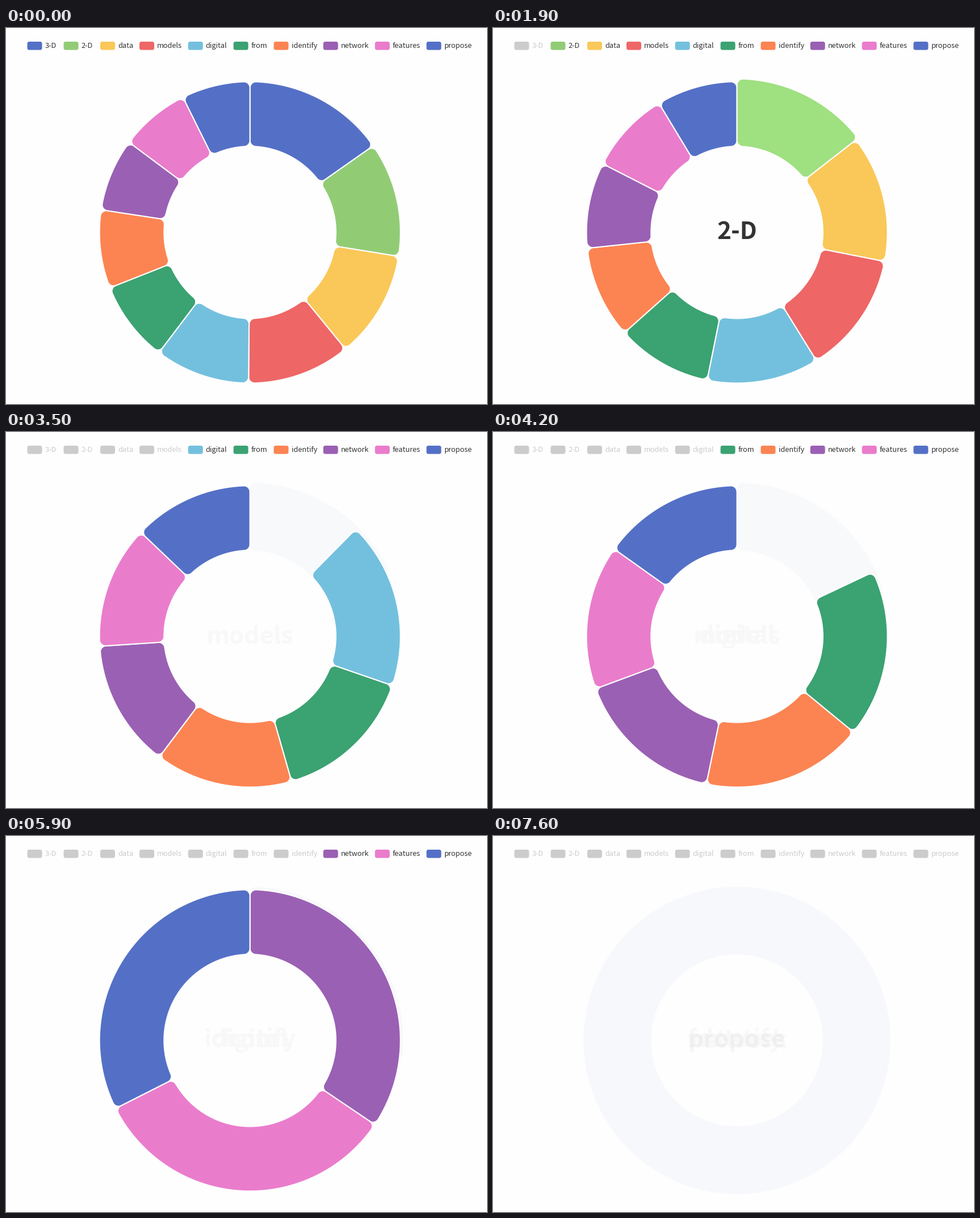
Animation of 847x661 px, one loop 8 s. Source, as a matplotlib script:

```python
import numpy as np
import matplotlib.pyplot as plt
from matplotlib.animation import FuncAnimation
from matplotlib.colors import to_rgb
from matplotlib.patches import FancyBboxPatch, PathPatch
from matplotlib.path import Path

W, H, DPI = 847, 661, 100
STEP, FRAMES = 100, 80
PT = 72 / DPI
CX, CY = 429.6, 359.3
R_IN, R_OUT, CORNER, LIFT = 151.3, 265, 10.5, 5
BG, DARK, OFF = "#fefefe", "#333333", "#cccccc"
GHOST_TEXT, GHOST_FILL = "#f8f8f8", "#f8f9fb"
FIRST_GHOST = 3

WORDS = ["3-D", "2-D", "data", "models", "digital",
         "from", "identify", "network", "features", "propose"]
VALUES = np.array([102, 82, 77, 74, 68, 58, 56, 52, 50, 49])
COLORS = ["#5470c6", "#91cc75", "#fac858", "#ee6666", "#73c0de",
          "#3ba272", "#fc8452", "#9a60b4", "#ea7ccc", "#5470c6"]
LEGEND_X = [37.5, 101.5, 166, 235, 320.7, 400.6, 471.5, 558.7, 649.7, 740.4]

# When the pointer reaches each legend entry, and when it is clicked (ms).
HOVER = [860, 1620, 2530, 3000, 3560, 4380, 4960, 5960, 6450, 7040]
CLICK = [1250, 1912, 2650, 3285, 4045, 4638, 5415, 6170, 6810, 7470]
MOVE_MS, FADE_MS, LIFT_MS = 500, 200, 300


def cubic_in_out(p):
    return 4 * p ** 3 if p < 0.5 else 1 - 4 * (1 - p) ** 3


def cubic_out(p):
    return 1 - (1 - p) ** 3


def progress(t, start, length):
    return min(max((t - start) / length, 0), 1)


def layout(first):
    """Start and end angle of every sector once those before first are gone."""
    live = VALUES * (np.arange(len(VALUES)) >= first)
    ends = np.cumsum(live) / max(live.sum(), 1) * 360
    return np.column_stack([np.r_[0, ends[:-1]], ends])


def ray(deg):
    """Unit vector, clockwise from the top, y pointing down."""
    a = np.radians(deg)
    return np.column_stack([np.sin(a), -np.cos(a)])


def arc(center, radius, a, b):
    n = max(int(abs(b - a) / 1.5), 8)
    return center + radius * ray(np.linspace(a, b, n))


def ring_path(r0, r1):
    mid = np.array([CX, CY])
    outer, inner = arc(mid, r1, 0, 360), arc(mid, r0, 360, 0)
    codes = [Path.MOVETO] + [Path.LINETO] * (len(outer) - 2) + [Path.CLOSEPOLY]
    return Path(np.vstack([outer, inner]), codes * 2)


def sector_path(a, b, r0, r1):
    if b - a > 359.9:
        return ring_path(r0, r1)
    c, mid = CORNER, np.array([CX, CY])
    d = np.degrees(np.arcsin(c / (r1 - c)))
    e = np.degrees(np.arcsin(c / (r0 + c)))

    def pivot(radius, deg):
        return mid + radius * ray(np.array([deg]))

    pts = np.vstack([
        arc(pivot(r1 - c, a + d), c, a - 90, a + d),
        arc(mid, r1, a + d, b - d),
        arc(pivot(r1 - c, b - d), c, b - d, b + 90),
        arc(pivot(r0 + c, b - e), c, b + 90, b - e + 180),
        arc(mid, r0, b - e, a + e),
        arc(pivot(r0 + c, a + e), c, a + e + 180, a + 270),
    ])
    return Path(np.vstack([pts, pts[:1]]),
                [Path.MOVETO] + [Path.LINETO] * (len(pts) - 1) + [Path.CLOSEPOLY])


def draw_sector(k, span, lift, alpha=1, z=2):
    gain = 1 + 0.1 * lift
    fill = [min(v * gain, 1) for v in to_rgb(COLORS[k])]
    path = sector_path(*span, R_IN, R_OUT + LIFT * lift)
    ax.add_patch(PathPatch(path, fc=fill, ec=BG, lw=2.1 * PT, alpha=alpha, zorder=z))


def draw_label(k, color=DARK, alpha=1, z=5):
    ax.text(CX, 371, WORDS[k], fontsize=42.3 * PT, weight="bold", color=color,
            alpha=alpha, ha="center", va="baseline", zorder=z)


def draw_legend(gone):
    for k, (x, word) in enumerate(zip(LEGEND_X, WORDS)):
        off = k < gone
        ax.add_patch(FancyBboxPatch((x, 24), 26, 14.6,
                                    boxstyle="round,pad=0,rounding_size=3.7",
                                    fc=OFF if off else COLORS[k], ec="none"))
        ax.text(x + 31, 35, word, fontsize=12.8 * PT, color=OFF if off else DARK,
                va="baseline")


def draw_removed(k, t):
    """Fade the last removed sector; a faint trace of it stays behind."""
    alpha = 1 - cubic_out(progress(t, CLICK[k], FADE_MS))
    span = layout(k)[k]
    if alpha > 0.04:
        draw_sector(k, span, 1, alpha, z=1)
        draw_label(k, alpha=alpha)
    elif k >= FIRST_GHOST:
        path = sector_path(*span, R_IN, R_OUT + LIFT)
        ax.add_patch(PathPatch(path, fc=GHOST_FILL, ec="none", zorder=1))
    newest = k if alpha <= 0.04 else k - 1
    for g in range(max(FIRST_GHOST, newest - 2), newest + 1):
        draw_label(g, GHOST_TEXT, z=4)


def draw(frame):
    t = frame * STEP
    ax.clear()
    ax.set(xlim=(0, W), ylim=(H, 0))
    ax.axis("off")

    gone = sum(t >= c for c in CLICK)
    draw_legend(gone)
    spans = layout(gone)
    if gone:
        p = cubic_in_out(progress(t, CLICK[gone - 1], MOVE_MS))
        spans = layout(gone - 1) * (1 - p) + spans * p
        draw_removed(gone - 1, t)
    for k in range(gone, len(WORDS)):
        lift = cubic_out(progress(t, HOVER[k], LIFT_MS))
        draw_sector(k, spans[k], lift, z=3 if lift else 2)
        if lift:
            draw_label(k)
    return []


plt.rcParams["font.family"] = ["Noto Sans CJK JP", "DejaVu Sans"]
fig = plt.figure(figsize=(W / DPI, H / DPI), dpi=DPI, facecolor=BG)
ax = fig.add_axes([0, 0, 1, 1])
anim = FuncAnimation(fig, draw, frames=FRAMES, interval=STEP,
                     init_func=lambda: [], repeat=True, repeat_delay=0)
plt.show()
```
